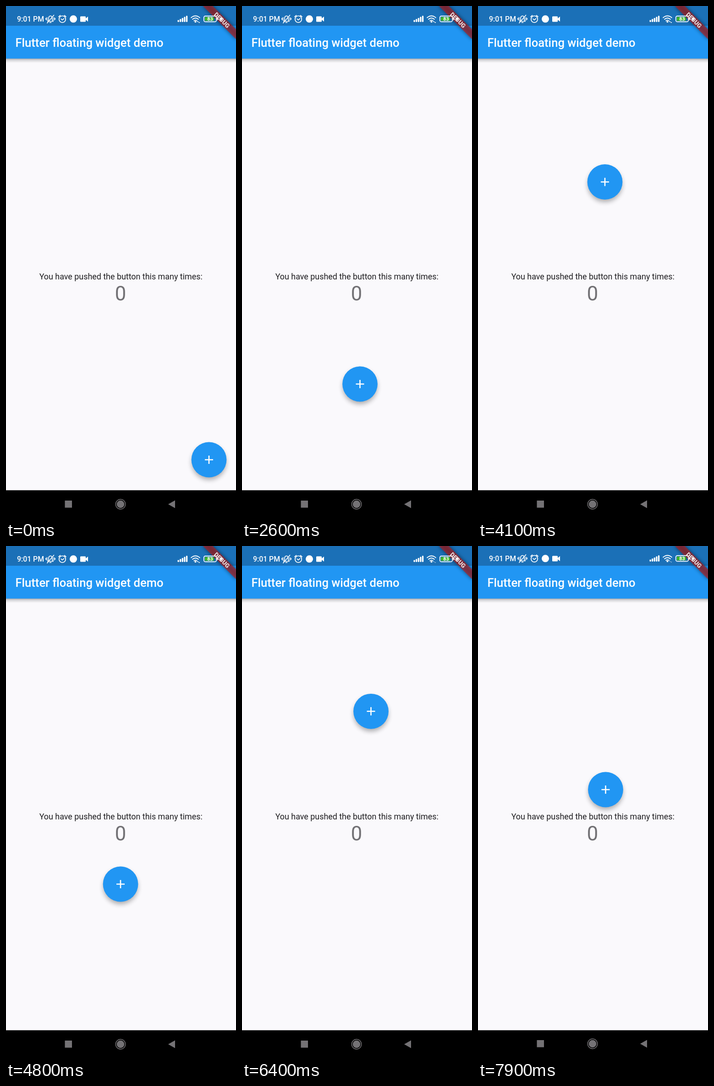
Write an HTML page that moves like this. It is 502 px wide and 1116 px high and loops after 8000 ms.

```html
<!DOCTYPE html>
<html lang="en">
<head>
<meta charset="utf-8">
<title>Floating widget demo</title>
<style>
  html, body { margin: 0; width: 100%; height: 100%; overflow: hidden; background: #faf9fc; }
  svg { display: block; width: 100vw; height: 100vh; font-family: Roboto, sans-serif; }
  .line { fill: none; stroke: #fff; stroke-width: 1.7; stroke-linecap: round; stroke-linejoin: round; }
</style>
</head>
<body>
<svg viewBox="0 0 502 1116" xmlns="http://www.w3.org/2000/svg">
  <defs>
    <linearGradient id="barShade" x2="0" y2="1">
      <stop offset="0" stop-opacity=".34"/>
      <stop offset=".4" stop-opacity=".14"/>
      <stop offset="1" stop-opacity="0"/>
    </linearGradient>
    <filter id="soft" x="-50%" y="-50%" width="200%" height="200%"><feGaussianBlur stdDeviation="5.5"/></filter>
    <filter id="bannerBlur" x="-20%" y="-150%" width="140%" height="400%"><feGaussianBlur stdDeviation="4.5"/></filter>
  </defs>

  <rect width="502" height="1116" fill="#faf9fc"/>
  <g text-anchor="middle">
    <text x="250.7" y="596" font-size="17.9" fill="#1f1e21">You have pushed the button this many times:</text>
    <text x="250" y="642" font-size="43.5" fill="#717074">0</text>
  </g>

  <rect y="114" width="502" height="10" fill="url(#barShade)"/>
  <rect width="502" height="114.6" fill="#2196f3"/>
  <rect width="502" height="43" fill="#1b70b7"/>
  <text x="20.5" y="89" font-size="25.6" font-weight="500" fill="#fff">Flutter floating widget demo</text>

  <g id="button">
    <circle cy="6" r="37.5" opacity=".32" filter="url(#soft)"/>
    <circle r="38.4" fill="#2196f3"/>
    <path d="M-9 0H9M0-9V9" stroke="#fff" stroke-width="2.6"/>
  </g>

  <g transform="translate(502 0) rotate(45)">
    <rect x="-51" y="35.8" width="102" height="15.3" opacity=".5" filter="url(#bannerBlur)"/>
    <rect x="-51" y="35.8" width="102" height="15.3" fill="#b71c1c" fill-opacity=".627"/>
    <text y="48" text-anchor="middle" font-size="13" font-weight="900" fill="#fff" fill-opacity=".85">DEBUG</text>
  </g>

  <g id="status" fill="#fff">
    <text x="24" y="34" font-size="15.8" font-weight="500">9:01 PM</text>
    <g class="line" stroke-width="1.5">
      <path d="M91 33.5H103L101 30.500V26.500Q101 22.500 97 21.500Q93 22.500 93 26.500V30.500ZM95.500 36H98.500M104.500 20L90 37"/>
      <path d="M89.500 25V31M87 26.500V29.500M104.500 25V31M107 26.500V29.500"/>
      <circle cx="123" cy="28.7" r="7.2"/>
      <path d="M115 23.500L118.500 20.500M131 23.500L127.500 20.500M120 28L122.700 30.500L126.500 27.500"/>
    </g>
    <circle cx="147" cy="28.300" r="8"/>
    <path d="M163.500 22.500H172.500Q174 22.500 174 24V27L179 23V34L174 30V33Q174 34.500 172.500 34.500H163.500Q162 34.500 162 33V24Q162 22.500 163.500 22.500Z"/>
    <g id="bars"></g>
    <g class="line" stroke-width="2.2">
      <path d="M404 25.500Q413.500 17.500 423 25.500M407 29Q413.500 23.500 420 29M410 32.300Q413.500 29.500 417 32.300"/>
    </g>
    <circle cx="413.500" cy="34.300" r="2"/>
    <path id="traffic" d="M417 35L418.700 32.500L420.400 35ZM420 35H423.500L421.700 37.500Z"/>
    <rect class="line" x="431.800" y="21.800" width="27.400" height="12.600" rx="3.500"/>
    <rect x="434" y="24" width="20" height="8.200" rx="1.500" fill="#43b62b"/>
    <text x="445.500" y="32" text-anchor="middle" font-size="10.800" font-weight="700">83</text>
    <rect x="460.500" y="25.500" width="2" height="5.500" rx="1"/>
    <path d="M470.500 22.500L465.500 29H469L467.500 34L473.500 27H470Z"/>
  </g>

  <rect y="1055.500" width="502" height="60.500" fill="#000"/>
  <g id="nav" fill="#747275">
    <rect x="128.500" y="1078" width="15.500" height="15.500"/>
    <circle cx="250" cy="1086" r="8.300"/>
    <circle cx="250" cy="1086" r="10.700" fill="none" stroke="#747275" stroke-width="1.500"/>
    <path d="M354 1086L369 1077.500V1094.500Z"/>
  </g>
</svg>
<script>
  const LOOP = 8000, STEP = 100;
  const $ = id => document.getElementById(id);
  const button = $('button'), status = $('status'), nav = $('nav'), traffic = $('traffic');

  // Drag path as [ms, x, y].
  const drag = [
    [0, 443, 989], [1850, 443, 989], [2000, 438, 980], [2200, 398, 925], [2400, 330, 855],
    [2600, 257.5, 824], [2800, 197, 876], [3000, 250, 973], [3200, 355, 930], [3300, 377, 830],
    [3500, 310, 692], [3600, 245, 678], [3700, 185, 765], [3800, 240, 874], [3900, 355, 800],
    [4000, 396, 570], [4100, 277, 383.5], [4200, 205, 360], [4400, 170, 475], [4500, 168, 545],
    [4600, 132, 640], [4700, 165, 725], [4800, 250, 737], [5000, 390, 570], [5200, 345, 340],
    [5400, 196.500, 251], [5500, 198, 330], [5700, 228, 680], [5900, 330, 903], [6100, 421, 690],
    [6300, 340, 420], [6400, 281.500, 360.300], [6550, 225, 450], [6800, 290, 840], [7000, 410, 690],
    [7200, 257.500, 485], [7300, 219, 600], [7500, 290, 873], [7700, 411, 720], [7900, 278.500, 531]
  ];

  function slope(i, axis) {
    if (i < 2 || i === drag.length - 1) return 0;
    const a = drag[i - 1], b = drag[i + 1];
    return (b[axis] - a[axis]) / (b[0] - a[0]);
  }

  function position(t) {
    const last = drag.length - 1;
    if (t >= drag[last][0]) return drag[last].slice(1);
    const i = drag.findIndex(key => key[0] > t) - 1;
    const a = drag[i], b = drag[i + 1], span = b[0] - a[0];
    const u = (t - a[0]) / span, u2 = u * u, u3 = u2 * u;
    return [1, 2].map(axis =>
      (2 * u3 - 3 * u2 + 1) * a[axis] + (3 * u2 - 2 * u3) * b[axis] +
      span * ((u3 - 2 * u2 + u) * slope(i, axis) + (u3 - u2) * slope(i + 1, axis)));
  }

  $('bars').innerHTML = Array.from({ length: 5 }, (_, i) => {
    const height = 4.5 + i * 2.3;
    return `<rect x="${374.500 + i * 4.600}" y="${35 - height}" width="3.300" height="${height}" rx="1.400"/>`;
  }).join('');

  function render(time) {
    const t = Math.floor((time % LOOP) / STEP) * STEP;
    const [x, y] = position(t);
    button.setAttribute('transform', `translate(${x} ${y})`);
    const lift = `translate(0 ${t >= 6800 ? -1 : 0})`;
    status.setAttribute('transform', lift);
    nav.setAttribute('transform', lift);
    traffic.setAttribute('opacity', t >= 5900 ? .45 : 1);
  }

  const start = performance.now();
  function tick() {
    render(performance.now() - start);
    requestAnimationFrame(tick);
  }
  tick();
</script>
</body>
</html>
```
